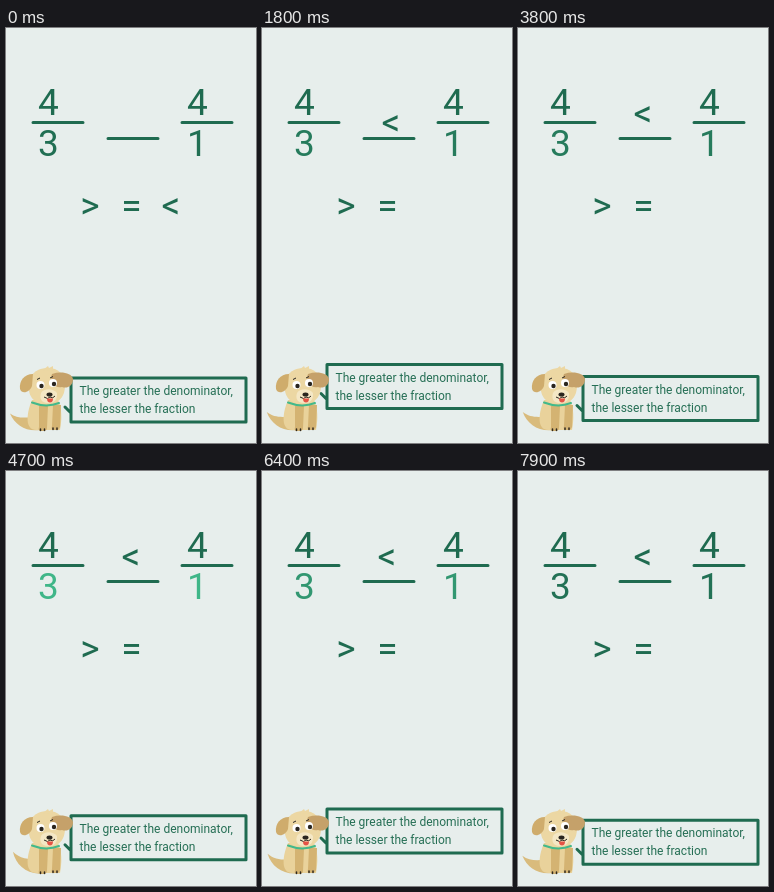
Animation, 250 px wide and 415 px high, one loop 8000 ms. Source, as an HTML page:

```html
<!DOCTYPE html>
<html lang="en">
<head>
<meta charset="utf-8">
<title>Comparing fractions</title>
<style>
  html, body { margin: 0; width: 100%; height: 100%; overflow: hidden; background: #e7eeec; }
  svg { display: block; width: 250px; height: 415px; }
  text { font: 37px Roboto, sans-serif; text-anchor: middle; fill: #1f6b50; }
  #bubble text { font-size: 12px; text-anchor: start; fill: #266f55; }
  .line { fill: none; stroke: #1f6b50; stroke-width: 3; stroke-linecap: round; stroke-linejoin: round; }
</style>
</head>
<body>
<svg viewBox="0 0 250 415">
  <text x="42.5" y="86.5">4</text>
  <text x="191.5" y="86.5">4</text>
  <text class="low" x="42.3" y="128">3</text>
  <text class="low" x="191.5" y="127.5">1</text>
  <path class="line" d="M27 94.5H77M176 94.5H226M102 110.5H152"/>

  <text x="84" y="190">&gt;</text>
  <text x="125.3" y="190">=</text>
  <text id="less" x="165" y="190">&lt;</text>

  <g id="bubble">
    <path class="line" d="M65 350H240V394H65zM59 379L65 385"/>
    <text x="73.5" y="367">The greater the denominator,</text>
    <text x="73.5" y="385">the lesser the fraction</text>
  </g>

  <g id="dog">
    <path id="tail" fill="#d9bb7c" d="M34 402C20 404 9 397 4 385.500C12 391 20 390 32 388z"/>
    <path fill="#e9d29b" d="M26 372C20 386 19 402 30 402H54C56 391 56 380 52 372z"/>
    <path fill="#d4b372" d="M33 378H42L41 400Q41 403 37 403H34Q32 402 33 399zM47 377H55L54 399Q53 402 50 402H47Q45 401 46 398z"/>
    <path stroke="#30291f" stroke-width="1.500" stroke-linecap="round" d="M34.500 401V402.500M38.500 401V402.500M47 400V401.500M51 400V401.500"/>
    <path fill="#ecd7a3" d="M23 354C25 344 33 340 42 340C52 340 59 346 59 357C59 371 51 376 40 376C27 376 21 367 23 354z"/>
    <path fill="#ecd7a3" d="M37 342L42 338L43 340L47 338L47 343z"/>
    <path fill="#cfac6c" d="M27 346C18 346 13 353 14 361C16 367 24 364 26 358z"/>
    <path fill="#c5a16a" d="M46 346C55 343 66 345 67 351C67 358 61 361 56 359C49 361 43 353 46 346z"/>
    <path fill="#f4e7c5" d="M35 365C38 360 47 360 51 365C52 373 46 376 42 375C36 375 33 371 35 365z"/>
    <g fill="#fff"><circle cx="34.500" cy="357" r="4"/><circle cx="47" cy="355" r="4"/></g>
    <g fill="#29251f">
      <circle cx="35.500" cy="358" r="2.200"/><circle cx="48" cy="356" r="2.200"/>
      <ellipse cx="43.500" cy="366.500" rx="3" ry="2"/>
    </g>
    <path fill="none" stroke="#29251f" d="M31 351.500L34 350M44 350L47 348.500M38 369Q42 372 44 369Q47 371 49 368"/>
    <path fill="#e45345" d="M41 370.500H47Q47 374.500 44 374.500T41 370.500z"/>
    <path fill="none" stroke="#42b98b" stroke-width="2" stroke-linecap="round" d="M26 374.500Q40 380 53 375"/>
  </g>
</svg>
<script>
  const $ = id => document.getElementById(id);
  const lows = document.querySelectorAll('.low');
  const dark = [31, 107, 80], bright = [74, 208, 156];

  // Linear swing 0 -> 1 -> 0 over one period
  const swing = (t, period) => {
    const p = (t / period % 1 + 1) % 1;
    return 1 - Math.abs(2 * p - 1);
  };

  function draw(now) {
    const t = Math.floor(now % 8000 / 100) * 100;
    const k = Math.min(t / 2000, 1);
    $('less').setAttribute('transform', `translate(${-40 * k} ${-92 * k})`);
    $('bubble').setAttribute('transform', `translate(0 ${-15 * swing(t, 4000)})`);
    $('tail').setAttribute('transform', `rotate(${16 * swing(t, 2000)} 30 398)`);
    const glow = swing(t + 40, 2000);
    const color = dark.map((c, i) => Math.round(c + (bright[i] - c) * glow));
    lows.forEach(el => el.style.fill = `rgb(${color})`);
  }

  const start = performance.now();
  function tick() {
    draw(performance.now() - start);
    requestAnimationFrame(tick);
  }
  tick();
</script>
</body>
</html>
```
